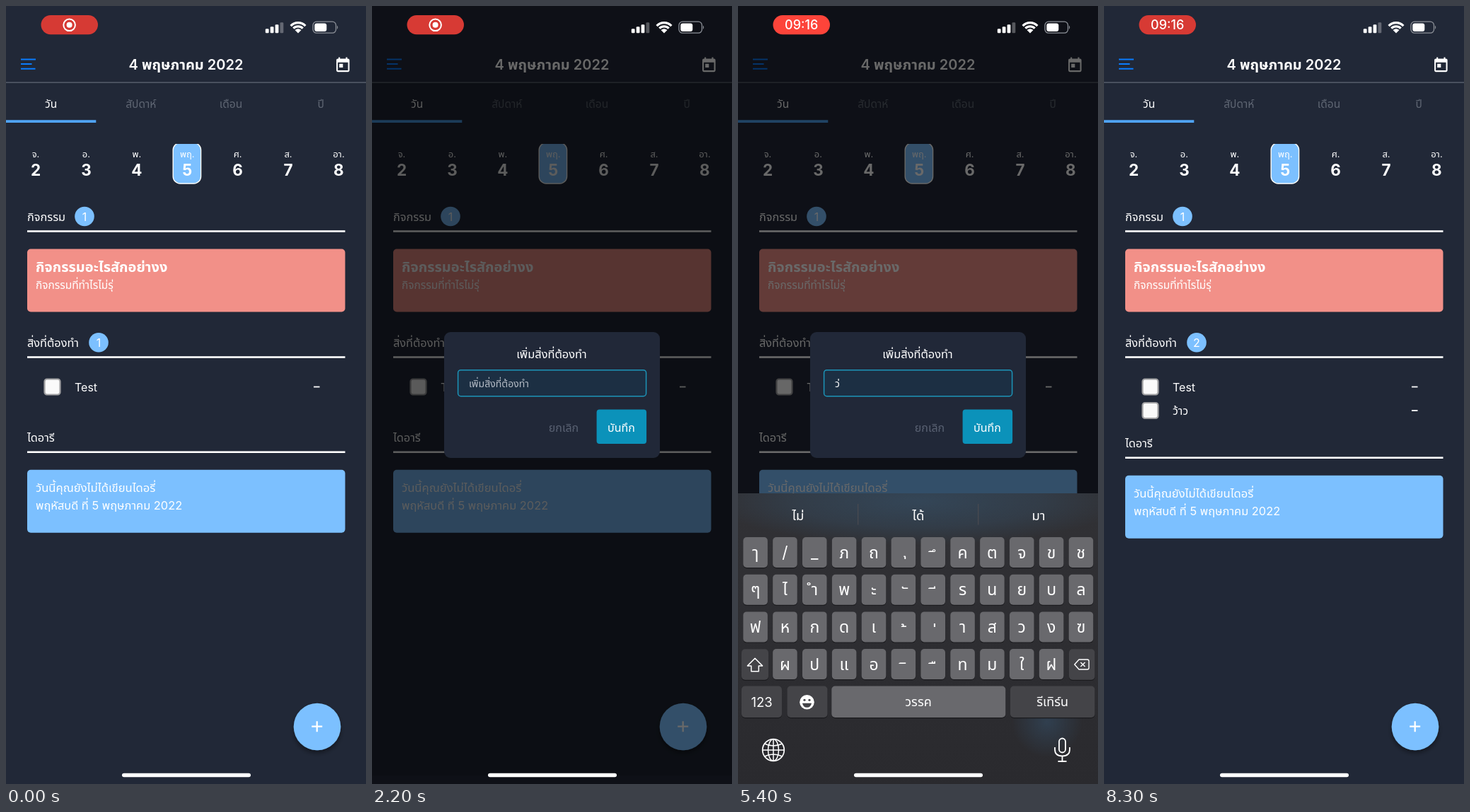
Write an HTML page that moves like this. It is 509 px wide and 1100 px high and loops after 8400 ms.

```html
<!DOCTYPE html>
<html lang="th">
<head>
<meta charset="utf-8">
<title>Planner</title>
<style>
html, body { margin: 0; width: 100%; height: 100%; overflow: hidden; background: #212837; }
svg { display: block; width: 509px; height: 1100px; }
text { font-family: Inter, "Noto Sans Thai Looped", "Noto Sans Thai", "Noto Sans", "Noto Sans CJK JP", "Noto Sans CJK", sans-serif; white-space: pre; }
</style>
</head>
<body>
<svg id="stage" viewBox="0 0 509 1100" xmlns="http://www.w3.org/2000/svg"></svg>
<script>
const LOOP = 8400, STEP = 100, KB_TOP = 689, KB_H = 411;
const BLUE = '#7cc0ff', KEY = '#69696d', DARK_KEY = '#444448';

// [time, value] tables, linear between points
const MOVES = {
  dim:      [[500, 0], [900, 1], [1900, 1], [2300, 0]],
  plus:     [[500, 0], [800, 45], [1900, 45], [2200, 0]],
  dial0:    [[800, 0], [1100, 1], [1900, 1], [2100, 0]],
  dial1:    [[700, 0], [1000, 1], [1900, 1], [2100, 0]],
  dial2:    [[600, 0], [900, 1], [1900, 1], [2100, 0]],
  dialog:   [[1700, 0], [1800, .05], [1900, .45], [2000, .8], [2100, 1], [7900, 1], [8000, .6], [8100, .25], [8200, 0]],
  keyboard: [[2400, KB_H], [2500, 360], [2600, 220], [2700, 101], [2800, 40], [2900, 12], [3000, 0],
             [7800, 0], [7900, 70], [8000, 235], [8100, 370], [8200, KB_H]]
};
// [time, value] tables that hold until the next entry
const LAYOUT = [[0, 'en'], [3600, 'ja'], [4400, 'th']];
const TYPED = [[0, ''], [4900, 'ว'], [5200, 'ว่'], [5700, 'ว'], [6100, 'ว้'], [6500, 'ว้า'], [6900, 'ว้าว']];
const PRESSES = [[4900, 'ว'], [5200, '่'], [5700, 'del'], [6100, '้'], [6500, 'า'], [6900, 'ว']];

const lerp = (a, b, k) => a + (b - a) * k;
function at(table, t) {
  if (t <= table[0][0]) return table[0][1];
  for (let i = 1; i < table.length; i++) {
    const [t0, a] = table[i - 1], [t1, b] = table[i];
    if (t <= t1) return lerp(a, b, (t - t0) / (t1 - t0));
  }
  return table[table.length - 1][1];
}
const held = (table, t) => table.reduce((v, [start, x]) => t >= start ? x : v, table[0][1]);

const attrs = o => Object.entries(o).map(([k, v]) => ` ${k}="${v}"`).join('');
const rect = (x, y, w, h, r, fill, more = {}) =>
  `<rect${attrs({ x, y, width: w, height: h, rx: r, fill, ...more })}/>`;
const circle = (cx, cy, r, fill, more = {}) => `<circle${attrs({ cx, cy, r, fill, ...more })}/>`;
const text = (x, y, size, str, more = {}) =>
  `<text${attrs({ x, y, 'font-size': size, fill: '#fff', ...more })}>${str}</text>`;
const mid = (x, y, size, str, more = {}) => text(x, y, size, str, { 'text-anchor': 'middle', ...more });
const line = (d, color, width, more = {}) =>
  `<path${attrs({ d, fill: 'none', stroke: color, 'stroke-width': width, ...more })}/>`;
const group = (id, body, more = {}) => `<g${attrs({ id, ...more })}>${body}</g>`;

function section(title, y, badge = '') {
  return text(30, y - 15, 16.3, title) + rect(30, y - 1.3, 449.5, 2.6, 0, '#fff') + badge;
}
const badge = (x, y, str, id) => circle(x, y, 13.8, BLUE) + mid(x, y + 6, 16, str, { id });

function todo(y, label) {
  return rect(54.5, y - 11, 22, 22, 3.5, '#fafafa', { stroke: '#a2a2a4', 'stroke-width': 2.2 }) +
    text(97, y + 6, 16, label) + rect(435, y - .9, 8.5, 1.8, 0, '#fff');
}

function header() {
  return line('M21 75.5H42M21 82H36.5M21 88.7H41.5', '#0a7cff', 2.1) +
    mid(254.5, 90, 20, '4 พฤษภาคม 2022', { 'font-weight': 600 }) +
    `<path transform="translate(464 71.5) scale(1.03)" fill="#fff" fill-rule="evenodd"
      d="M19 3h-1V1h-2v2H8V1H6v2H5C3.9 3 3 3.9 3 5V19c0 1.1.9 2 2 2h14c1.1 0 2-.9 2-2V5c0-1.1-.9-2-2-2zm0 16H5V8h14zM7 10h5v5H7z"/>` +
    rect(0, 107.6, 509, 1, 0, '#707784');
}

function page() {
  const tabs = ['วัน', 'สัปดาห์', 'เดือน', 'ปี'].map((s, i) =>
    mid(63.6 + 127.2 * i, 144, 15.5, s, { fill: i ? '#5f6673' : '#fff' })).join('');
  const days = ['จ.', 'อ.', 'พ.', 'พฤ.', 'ศ.', 'ส.', 'อา.'].map((s, i) => {
    const x = 42 + 71.4 * i;
    return mid(x, 214, 13, s) + mid(x, 239.5, 22.5, i + 2, { 'font-weight': 700 });
  }).join('');
  return tabs + rect(0, 161.2, 127.3, 3.8, 0, '#4fa3f3') +
    rect(236.2, 193.6, 39.4, 57.4, 10, BLUE, { stroke: '#fff', 'stroke-width': 1.4, 'clip-path': 'url(#dayClip)' }) + days +
    section('กิจกรรม', 318.5, badge(111, 297.5, 1, 'b0')) +
    rect(30, 343.5, 449.5, 89, 5, '#f29088') +
    text(42, 376, 20, 'กิจกรรมอะไรสักอย่างง', { 'font-weight': 600 }) +
    text(42, 399.5, 15.4, 'กิจกรรมที่ทำไรไม่รุ่') +
    section('สิ่งที่ต้องทำ', 496.5, badge(131, 475.8, 1, 'count')) +
    todo(538.5, 'Test') + group('newTodo', todo(572, 'ว้าว')) +
    group('diary', section('ไดอารี', 630.7) + rect(30, 655.7, 449.5, 89, 5, BLUE) +
      text(42, 687, 16.6, 'วันนี้คุณยังไม่ได้เขียนไดอรี่') +
      text(42, 712, 16.4, 'พฤหัสบดี ที่ 5 พฤษภาคม 2022'));
}

function dial() {
  const ink = '#e8eaef';
  const icons = [
    line('M-13-9h7v7h-7zM1-5.5H14M1 7H14M-14 7l4 4 8-8', ink, 2.8),
    line('M0-9C-5-13-11-12-15-10V12C-10 9-5 10 0 13C5 10 10 9 15 12V-9M0-9V13', ink, 2.8) +
      `<path d="M4-7L12-15V4L4 9z" fill="${ink}"/>`,
    line('M-13-1C-8-7-2-7-3-2C-4 3-13 3-12 8C-11 13-2 12 3 7', ink, 3.2, { 'stroke-linecap': 'round' }) +
      `<path d="M-1 4L0-1L9-10L13-6L4 3zM10-11L12.500-13.500Q14-14.500 16-12.500Q17-11 16.500-9.500L14-7z" fill="${ink}"/>`
  ];
  return ['สิ่งที่ต้องทำ', 'ไดอารี', 'กิจกรรม'].map((s, i) => {
    const y = 748.5 + 90.3 * i;
    return group('dial' + i, text(378, y + 8, 16.3, s, { 'text-anchor': 'end' }) +
      `<g transform="translate(440 ${y})"><g id="disc${i}">${circle(0, 0, 33.3, '#657089', { filter: 'url(#shadow)' })}${icons[i]}</g></g>`);
  }).join('');
}

function dialog() {
  return rect(0, 0, 509, 1100, 0, '#000', { opacity: .59 }) + rect(102, 461, 305, 178, 9, '#212838') +
    mid(254, 498, 16.4, 'เพิ่มสิ่งที่ต้องทำ', { 'font-weight': 500 }) +
    rect(121.6, 514.7, 266, 37, 4, '#1c2f43', { stroke: '#1c94b8', 'stroke-width': 1.5 }) +
    text(137, 538.5, 14, '', { id: 'field' }) +
    mid(271, 601.5, 16, 'ยกเลิก', { fill: '#596172' }) +
    rect(317.6, 570.5, 70.5, 48.5, 4, '#0b92ba', { id: 'save' }) + mid(352.5, 601.5, 16, 'บันทึก', { 'font-weight': 500 });
}

const arrow = (x, y, s, fill, color) =>
  `<path transform="translate(${x} ${y}) scale(${s})" d="M0-11L12 1H6V10H-6V1H-12z" fill="${fill}" stroke="${color}" stroke-width="1.7" stroke-linejoin="round"/>`;
const eraser = (x, y, s) => `<g transform="translate(${x} ${y}) scale(${s})">` +
  line('M-13 0L-5-9H10Q13-9 13-6V6Q13 9 10 9H-5zM-2-4L6 4M6-4L-2 4', '#fff', 1.8, { 'stroke-linejoin': 'round' }) + '</g>';
const key = (x, y, w, h, fill = KEY, id) =>
  rect(x, y + 1.2, w, h, 5, '#1b1b1e') + rect(x, y, w, h, 5, fill, id ? { id } : {});

function bottomRow(y, h, space, enter, spaceId) {
  const base = y + h / 2;
  return key(5, y, 57, h, DARK_KEY) + mid(33.5, base + 7, 18.5, '123') +
    key(69.5, y, 57, h, DARK_KEY) + circle(97.5, base + .5, 10.3, '#fff') +
    circle(94, base - 2.5, 1.6, DARK_KEY) + circle(101, base - 2.5, 1.6, DARK_KEY) +
    `<path d="M91 ${base + 2}H104Q103 ${base + 8} 97.500 ${base + 8}Q92 ${base + 8} 91 ${base + 2}z" fill="${DARK_KEY}"/>` +
    key(132.3, y, 246, h) + mid(255, base + 6, 18, space, { id: spaceId }) +
    key(385, y, 119.500, h, DARK_KEY) + mid(444.7, base + 6, 18, enter);
}

function latinKeys(id, rows, space, enter, upper) {
  const pitch = 50.6;
  const starts = [5, rows[1].length === 10 ? 5 : 30.5, 82];
  const keys = rows.map((row, r) => [...row].map((c, i) => {
    const x = starts[r] + pitch * (r === 2 ? .995 : 1) * i, y = 752 + 66.6 * r;
    return key(x, y, 43.6, 53.2) + mid(x + 21.8, y + 35, 26, c, { 'font-weight': 300 });
  }).join('')).join('');
  return group(id, keys + key(5, 885.200, 55.5, 53.2, upper ? '#dcdce0' : DARK_KEY) +
    arrow(32.5, 913, .95, upper ? '#000' : 'none', upper ? '#000' : '#fff') +
    key(448.8, 885.200, 55.5, 53.2, DARK_KEY) + eraser(476.5, 912, 1) +
    bottomRow(952, 53.2, space, enter, id + 'Space'));
}

const THAI = ['ๅ/_ภถุึคตจขช', 'ๆไำพะัีรนยบล', 'ฟหกดเ้่าสวงฃ', 'ผปแอิืทมใฝ'];
const MARK_SHIFT = { 'ุ': -5, 'ึ': 6, 'ั': 6, 'ี': 6, 'ิ': 6, 'ื': 6, '้': 7, '่': 7 };
const thaiAt = (col, row) => [24.6 + 41.85 * col, 751 + 52.7 * row];
// A lone vowel or tone sits on a blank base
const glyph = (c, x, y, size, id) => {
  const shift = MARK_SHIFT[c];
  return mid(x + (shift ? size * .1 : 0), y + (shift || 0), size, shift ? '\u00a0' + c : c, id ? { id } : {});
};

function thaiKeys() {
  const keys = THAI.map((row, r) => [...row].map((c, i) => {
    const [x, y] = thaiAt(i + (r === 3 ? 1 : 0), r);
    return key(x - 17.3, y, 34.6, 43) + glyph(c, x, y + 29.5, 23);
  }).join('')).join('');
  return group('th', keys + key(5, 909.2, 38, 43.5, DARK_KEY) + arrow(24, 932, .88, 'none', '#fff') +
    key(468, 909.2, 36.5, 43.5, DARK_KEY, 'del') + eraser(486, 931, .78) +
    bottomRow(961.5, 44.5, 'วรรค', 'รีเทิร์น', 'thSpace'));
}

function keyboard() {
  const words = [0, 1, 2].map(i => mid(85 + 170 * i, 727, 18.5, '', { id: 'word' + i })).join('');
  const globe = line('M34.500 1052H65.500M50 1036.500V1067.500M37.500 1043Q50 1049 62.500 1043M37.500 1061Q50 1055 62.500 1061', '#fff', 1.5) +
    circle(50, 1052, 15.300, 'none', { stroke: '#fff', 'stroke-width': 1.7 }) +
    `<ellipse cx="50" cy="1052" rx="7.500" ry="15.300" fill="none" stroke="#fff" stroke-width="1.500"/>`;
  const mic = rect(454, 1035.500, 9, 20, 4.5, 'none', { stroke: '#fff', 'stroke-width': 1.8 }) +
    line('M448 1048V1051Q448 1060.500 458.500 1060.500Q469 1060.500 469 1051V1048M458.500 1060.500V1068M452.500 1068H464.500', '#fff', 1.8);
  return group('words', line('M169.700 704V733.500M339.700 704V733.500', '#4c4c51', 1.2) + words) +
    latinKeys('en', ['QWERTYUIOP', 'ASDFGHJKL', 'ZXCVBNM'], 'space', 'return', true) +
    latinKeys('ja', ['qwertyuiop', 'asdfghjkl–', 'zxcvbnm'], '日本語ローマ字', '改行', false) +
    thaiKeys() + globe + mic + group('popup', '');
}

function popup(c) {
  const r = THAI.findIndex(row => row.includes(c));
  const [x, y] = thaiAt([...THAI[r]].indexOf(c), r);
  return `<path fill="#6d6d71" d="M${x - 17.3} ${y + 39}V${y + 2}Q${x - 17} ${y - 6} ${x - 27} ${y - 14}V${y - 52}Q${x - 27} ${y - 60} ${x - 19} ${y - 60}H${x + 19}Q${x + 27} ${y - 60} ${x + 27} ${y - 52}V${y - 14}Q${x + 17} ${y - 6} ${x + 17.3} ${y + 2}V${y + 39}Q${x + 17} ${y + 43} ${x + 13} ${y + 43}H${x - 13}Q${x - 17} ${y + 43} ${x - 17.3} ${y + 39}z"/>` +
    glyph(c, x, y - 21, 34);
}

function statusBar() {
  const bars = [6, 9, 12, 15].map((h, i) => rect(366.8 + 6.9 * i, 38.300 - h, 4.8, h, 1.2, '#fff', { opacity: i === 3 ? .3 : 1 })).join('');
  const arc = r => line(`M${413 - r * .72} ${38 - r * .69}A${r} ${r} 0 0 1 ${413 + r * .72} ${38 - r * .69}`, '#fff', 3.3);
  return rect(49.5, 13, 80.5, 27.2, 13.6, '#d53a33', { id: 'pill' }) +
    group('rec', circle(89.6, 26.8, 8.3, 'none', { stroke: '#fff', 'stroke-width': 2 }) + circle(89.6, 26.8, 4, '#fff')) +
    mid(89.7, 33.2, 18, '09:16', { id: 'clock', 'font-weight': 500 }) + bars + arc(14.4) + arc(9.2) +
    '<path d="M413 38.500L408.500 34Q413 30.500 417.500 34z" fill="#fff"/>' +
    rect(434, 22.2, 32.500, 16, 5, 'none', { stroke: '#8d9199', 'stroke-width': 1.3 }) +
    rect(436.3, 24.5, 17, 11.4, 3, '#fff') + '<path d="M468 27.500Q470.500 30 468 33z" fill="#8d9199"/>';
}

const stage = document.getElementById('stage');
stage.innerHTML = `<defs>
  <clipPath id="dayClip"><rect x="230" y="195" width="52" height="60"/></clipPath>
  <clipPath id="kbClip"><rect id="kbMask" width="509" height="420"/></clipPath>
  <filter id="shadow" x="-30%" y="-30%" width="160%" height="170%"><feDropShadow dx="0" dy="4" stdDeviation="3" flood-opacity=".4"/></filter>
  <linearGradient id="board" x2="0" y2="1"><stop stop-color="#313135"/><stop offset="1" stop-color="#2a2a2e"/></linearGradient>
  <radialGradient id="cardTint"><stop stop-color="#34485b" stop-opacity=".9"/><stop offset=".6" stop-color="#34485b" stop-opacity=".5"/><stop offset="1" stop-color="#34485b" stop-opacity="0"/></radialGradient>
  <radialGradient id="fabTint"><stop stop-color="#32465a" stop-opacity=".75"/><stop offset="1" stop-color="#32465a" stop-opacity="0"/></radialGradient>
</defs>` +
  rect(0, 0, 509, 1100, 0, '#212837') + header() + page() +
  rect(0, 109, 509, 979, 0, '#000', { id: 'dim' }) + dial() +
  circle(440, 1019, 33.3, BLUE, { filter: 'url(#shadow)' }) +
  `<g transform="translate(439.700 1018.700)">${line('M-7.500 0H7.500M0-7.500V7.500', '#fff', 2.3, { id: 'plus' })}</g>` +
  group('dialog', dialog()) +
  `<g clip-path="url(#kbClip)">${rect(0, KB_TOP, 509, KB_H, 0, 'url(#board)')}
    <ellipse cx="254" cy="700" rx="290" ry="62" fill="url(#cardTint)"/>${circle(437, 1012, 50, 'url(#fabTint)')}</g>` +
  group('keys', keyboard()) + statusBar() + rect(164, 1084.7, 182, 5.6, 2.8, '#fff');

const $ = Object.fromEntries([...stage.querySelectorAll('[id]')].map(el => [el.id, el]));
const show = (el, on) => el.setAttribute('visibility', on ? 'visible' : 'hidden');

function draw(t) {
  const pulse = (1 - Math.cos(t / 2100 * 2 * Math.PI)) / 2;
  $.pill.setAttribute('fill', `rgb(${lerp(214, 255, pulse)},${lerp(58, 68, pulse)},${lerp(52, 58, pulse)})`);
  show($.rec, t < 2300);
  show($.clock, t >= 2300);

  const done = t >= 8200;
  $.count.textContent = done ? 2 : 1;
  show($.newTodo, done);
  $.diary.setAttribute('transform', `translate(0 ${done ? 8 : 0})`);

  $.dim.setAttribute('opacity', .49 * at(MOVES.dim, t));
  $.plus.setAttribute('transform', `rotate(${at(MOVES.plus, t)})`);
  for (let i = 0; i < 3; i++) {
    const k = at(MOVES['dial' + i], t);
    $['dial' + i].setAttribute('opacity', k);
    $['disc' + i].setAttribute('transform', `scale(${k})`);
  }

  $.dialog.setAttribute('opacity', at(MOVES.dialog, t));
  const typed = held(TYPED, t);
  $.field.textContent = typed || 'เพิ่มสิ่งที่ต้องทำ';
  $.field.setAttribute('fill', typed ? '#fff' : '#b4bbc5');
  $.save.setAttribute('opacity', t >= 7700 && t < 7900 ? .6 : 1);

  const drop = at(MOVES.keyboard, t), layout = held(LAYOUT, t);
  $.kbMask.setAttribute('y', KB_TOP + drop);
  $.keys.setAttribute('transform', `translate(0 ${drop})`);
  show($.keys, drop < KB_H);
  for (const id of ['en', 'ja', 'th']) $[id].setAttribute('display', id === layout ? 'inline' : 'none');
  show($.words, layout !== 'ja' && drop < KB_H);
  const words = layout === 'en' ? ['I', 'Hi', 'Jvvjvj'] : t < 6900 ? ['ไม่', 'ได้', 'มา'] : ['มี', 'ว้าว', 'พี่'];
  words.forEach((w, i) => $['word' + i].textContent = w);
  $.thSpace.textContent = t < 4900 ? 'ไทย' : 'วรรค';

  const press = PRESSES.find(([start]) => t >= start && t < start + 200);
  const pressed = press && press[1];
  $.del.setAttribute('fill', pressed === 'del' ? KEY : DARK_KEY);
  $.popup.innerHTML = pressed && pressed !== 'del' ? popup(pressed) : '';
}

const began = performance.now();
let last = -1;
function tick() {
  const t = Math.floor((performance.now() - began) % LOOP / STEP) * STEP;
  if (t !== last) draw(last = t);
  requestAnimationFrame(tick);
}
tick();
</script>
</body>
</html>
```
